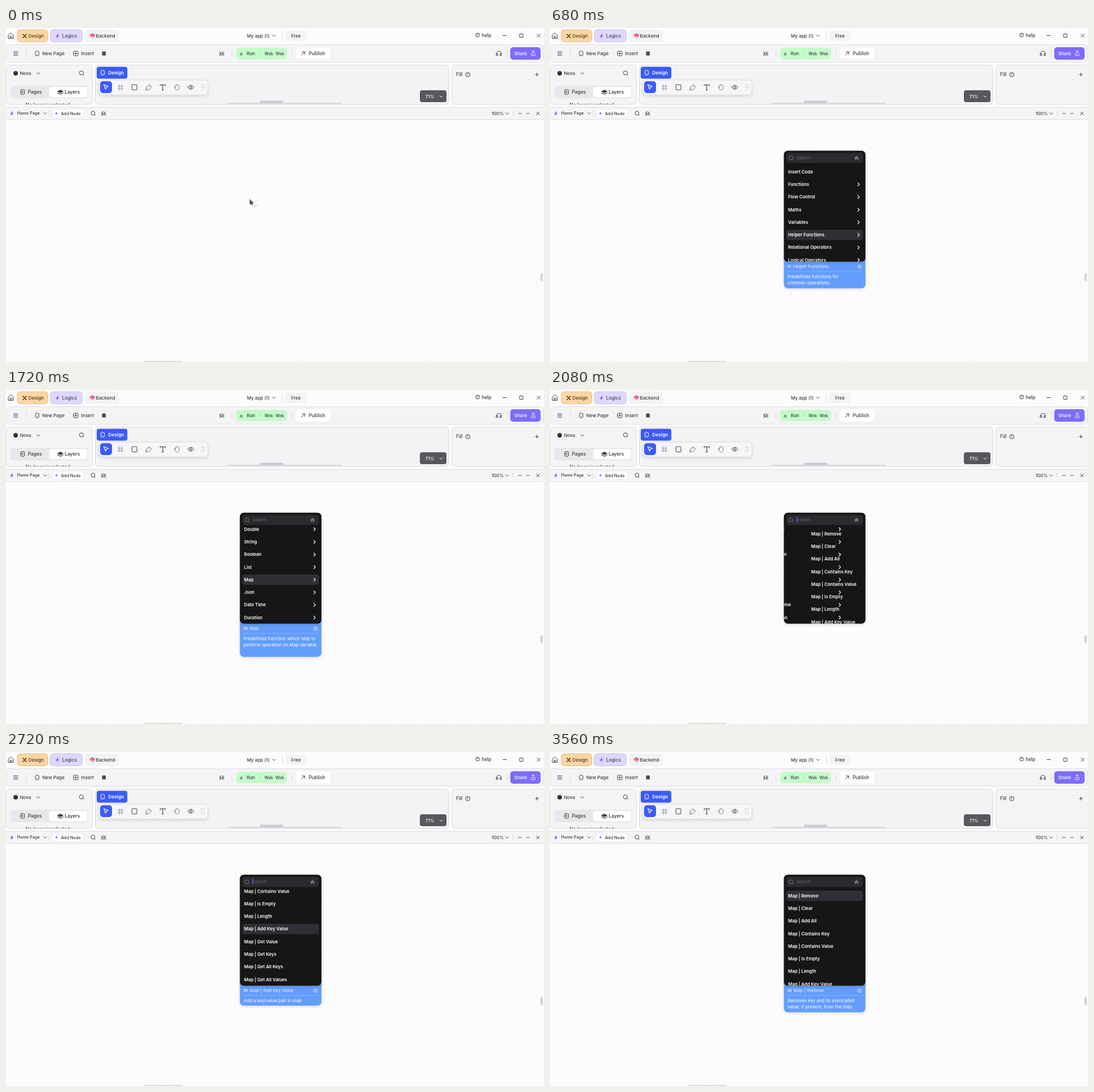
These frames come from a looping animation (949x590 px, 3600 ms). An HTML page:

```html
<!DOCTYPE html>
<html lang="en">
<head>
<meta charset="utf-8">
<title>Node menu</title>
<style>
html, body { margin: 0; width: 100%; height: 100%; overflow: hidden; background: #fdfcfd; }
svg { display: block; font-family: Inter, Roboto, sans-serif; font-weight: 500; }
text { white-space: pre; }
</style>
</head>
<body>
<svg id="stage" width="949" height="590" viewBox="0 0 949 590"></svg>
<script>
const stage = document.getElementById('stage');
const INK = '#3c3c40';

const box = (x, y, w, h, r, fill, line = 'none', more = '') =>
  `<rect x="${x}" y="${y}" width="${w}" height="${h}" rx="${r}" fill="${fill}" stroke="${line}" ${more}/>`;
const label = (x, cy, s, size = 8.2, fill = INK, weight = 500) =>
  `<text x="${x}" y="${cy + size * .36}" font-size="${size}" fill="${fill}" font-weight="${weight}">${s}</text>`;
const line = (d, color = INK, w = 1, fill = 'none') =>
  `<path d="${d}" fill="${fill}" stroke="${color}" stroke-width="${w}" stroke-linecap="round" stroke-linejoin="round"/>`;
const dot = (x, y, r, fill, edge = 'none') =>
  `<circle cx="${x}" cy="${y}" r="${r}" fill="${fill}" stroke="${edge}"/>`;
const down = (x, y, color = INK) => line(`M${x - 2.5} ${y - 1.2}l2.5 2.5 2.5-2.5`, color);
const plus = (x, y, r, color = INK) => line(`M${x - r} ${y}h${2 * r}M${x} ${y - r}v${2 * r}`, color);
const cross = (x, y, r) => line(`M${x - r} ${y - r}l${2 * r} ${2 * r}m0 ${-2 * r}l${-2 * r} ${2 * r}`);
const rule = (x, y, h) => line(`M${x} ${y}v${h}`, '#d8d8dc');
const lens = (x, y, r, color = INK) =>
  dot(x, y, r, 'none', color) + line(`M${x + r * .72} ${y + r * .72}l1.6 1.6`, color);
const bolt = (x, y, color) => line(`M${x + 1} ${y - 3.5}l-3.5 4h2l-1 3.2 3.6-4.3h-2z`, color, .6, color);
const phone = (x, y, color) =>
  box(x - 3, y - 4, 6, 8, 1.4, 'none', color) + line(`M${x - .5} ${y + 2}h1`, color, .8);
const bug = (x, y) =>
  line(`M${x - 2} ${y - 1.5}q2-3.4 4 0v2.6q-2 4-4 0z` +
    [-1.6, .6, 2.6].map(d => `M${x - 2} ${y + d}l-2 ${d * .4}M${x + 2} ${y + d}l2 ${d * .4}`).join('') +
    `M${x - 1} ${y + .6}h2`, INK, .9);
const help = (x, y, r) => dot(x, y, r, 'none', INK) + label(x - 1.9, y, '?', r * 1.65);

function titleBar() {
  return line('M4.3 12.3l4.2-3.8 4.2 3.8v6h-8.4zM7.3 18v-3.5h2.4V18') +
    box(20, 3, 54, 21.5, 5, '#fad6a3', '#e9c084') +
    line('M30 11l6 6M36 11l-6 6', '#4b3616', 1.6) + label(39.5, 14, 'Design', 8.2, '#4b3616') +
    box(78, 3, 56.5, 21.5, 5, '#dfd8fb', '#c9bff0') +
    bolt(91, 14, '#8058f5') + label(99, 14, 'Logics', 8.3, '#4a4160') +
    box(139, 3, 60.5, 21.5, 5, '#f3f2f4') +
    line('M149 14.5q-2-3.5 1.5-3.7 1.5-2.4 3.6 0 3.4.1 2 3.7z', '#f0608c', .8, '#f0608c') +
    line('M150.7 15v2.5M152.7 15v3M154.7 15v2.5', '#f0608c', .8) +
    label(158.5, 14, 'Backend', 8.2) +
    label(425, 14, 'My app (1)', 8) + down(472.5, 13.8) + rule(487.5, 8, 12) +
    box(493, 5, 36.5, 17.5, 4, '#f3f3f4') + label(503, 14, 'Free', 8) +
    help(832, 12.5, 3.4) + label(839, 12.7, 'help', 8.3) +
    line('M876.5 13.5h6.5') + box(906, 10.5, 6, 6, .5, 'none', INK) + cross(939.5, 13.5, 2.8);
}

function toolBar() {
  return box(.5, 29.5, 948, 31, 6, '#f4f3f5', '#dedde1') +
    line('M13.5 42h7.5M13.5 45h7.5M13.5 48h7.5') + rule(36, 39, 12) +
    phone(55, 45, INK) + label(64, 45, 'New Page', 8.1) +
    box(119, 41, 8, 8, 1.5, 'none', INK) + plus(123, 45, 2) + label(132.5, 45, 'Insert', 8.2) +
    box(169.5, 41.5, 6.5, 7, 0, '#4a4a4e') + bug(380.5, 45) + rule(398.5, 39, 12) +
    box(406.5, 35, 89, 20, 5, '#c6fac9') + dot(415, 46, 2.6, '#78a881') +
    label(424.5, 45, 'Run', 8.1) + line('M447.5 40v10', '#b0e6b4') +
    label(456, 45.4, 'Web', 7) + label(475.5, 45.4, 'Web', 7) + rule(504, 39, 12) +
    box(512, 34.5, 60, 20.5, 4, '#fff') + line('M521.5 47.7l5.4-5.4M522.5 42.2h4.5v4.5') +
    label(534, 45, 'Publish', 8.3) +
    line('M865 46.2q0-4.8 4.5-4.8t4.5 4.8M865.2 45.5h2.2v3h-2.2zM871.6 45.5h2.2v3h-2.2z') + rule(884, 39, 12) +
    box(889.5, 34, 53.5, 22, 5, '#7d6df7') + label(896.5, 45, 'Share', 8.1, '#fff') +
    line('M926.8 45v3.8h6.4V45M930 46.5v-6.2M927.8 42.3l2.2-2.2 2.2 2.2', '#fff', .9);
}

function panels() {
  const grips = [344.5, 348.5].map(x => [101, 104.8, 108.6].map(y => dot(x + .5, y, .9, '#bdbdc4')).join('')).join('');
  return box(.5, 65.5, 152, 69.5, 6, '#f4f4f6', '#dcdce0') +
    dot(17, 80, 4, '#333336') + label(24.5, 80, 'Nova', 8, INK) + down(57, 80) + lens(133, 79.3, 3.6) +
    box(8, 102, 136.5, 22.5, 5, '#e8e8eb') + box(76, 104, 67.5, 18.7, 4, '#fff', '#ececef') +
    line('M27 109h4.5q1 0 1 1v6q0 1-1 1H27q-1 0-1-1v-6q0-1 1-1M26 113h4M28.6 111.5l1.5 1.5-1.5 1.5') +
    label(38.5, 113, 'Pages', 8.4) +
    line('M91 112l5-2.6 5 2.6-5 2.6z', INK, .8, INK) + line('M91 114.6l5 2.6 5-2.6', INK, 1.1) +
    label(103.5, 113, 'Layers', 8.4, '#2e2e32') +
    `<g clip-path="url(#tops)">${label(34.5, 136, 'No layer is selected', 8.4)}</g>` +
    box(157.5, 65.5, 623.5, 69.5, 6, '#f3f3f5', '#d9d9de') +
    box(392, 132, 200, 2.6, 1, '#dadade') + box(448, 128.6, 41, 4, 1, '#cacad4') +
    box(160, 68.5, 54, 21, 4, '#3c5bf4') + phone(170.5, 79, '#fff') + label(180.5, 79.2, 'Design', 8.2, '#fff', 600) +
    box(164, 92, 192, 26, 6, '#f6f6f8', '#dfdfe4', 'filter="url(#soft)"') +
    box(166, 94, 21, 21, 5, '#3c5bf4') + line('M172.5 100l8 3.2-3.4 1.3-1.4 3.5z', '#fff', 1.1) +
    line('M199.8 100v10M204 100v10M197 102.9h10M197 107h10', '#8e8e94', .9) +
    box(222, 100.2, 9, 9, 1, 'none', INK) +
    line('M246.5 109.5l1.3-6.2 4.6-2.2 3.5 3.5-2.4 4zM246.5 109.5l4.3-4.4M252.5 100l4 4', '#77777d', .9) +
    line('M272 102v-1.8h9v1.8M276.5 100.2v9.3M275 109.5h3', INK, 1.1) +
    line('M297.5 105.5l-1.2-1.4q1.5-1.4 2.8 1.2v-4.4q1-1 1.6 0v-1q1-1 1.6 0v1q1-1 1.6 0v1.2q1-1 1.6 0v4q-.5 3.8-4 3.8-2.6 0-4-4.4z', '#77777d', .9) +
    line('M320.5 104.7q5.5-7.4 11 0-5.5 7.4-11 0z') + dot(326, 104.7, 1.7, 'none', INK) + grips +
    box(730, 110, 47, 21, 4, '#57585c') + label(739.5, 121, '71%', 8.2, '#fff') + down(767.5, 121, '#fff') +
    box(786.5, 65.5, 166, 69.5, 6, '#f4f4f6', '#dcdce0') + label(794, 82.5, 'Fill', 8.3) +
    help(814.5, 82.3, 3.9) + plus(936.5, 82.3, 2.8);
}

function canvas() {
  return box(-2, 162, 953, 430, 0, '#fdfcfd') + box(0, 162, 949, 428, 0, 'url(#dots)') +
    box(-.5, 140, 950, 21.7, 4, '#f5f4f6', '#dcdce0') +
    bolt(10.5, 151, '#7a55f2') + label(19.5, 150.6, 'Home Page', 7.3) + down(69, 150.8) + rule(76, 146, 10) +
    box(82, 143.5, 55, 14.5, 4, '#fff', '#ececf0') + plus(89, 150.8, 2, '#6a4df0') + label(97, 151, 'Add Node', 7.3) +
    lens(153.3, 150.4, 3.4) + bug(172, 151) +
    label(856.5, 151, '100%', 8) + down(884, 151) + rule(894.5, 147, 8) +
    line('M904.2 152.2l2.5-2.5 2.5 2.5') + [918.5, 920.8, 923.1].map(x => dot(x, 151, .8, INK)).join('') +
    cross(938.3, 151, 2.6) +
    box(942.5, 433, 4.5, 14, 1.5, '#d5d5da') + box(243, 588.6, 67.5, 2, 0, '#d3d0c8');
}

// Menu content
const mapItems = ['Remove', 'Clear', 'Add All', 'Contains Key', 'Contains Value', 'Is Empty', 'Length',
  'Add Key Value', 'Get Value', 'Get Keys', 'Get All Keys', 'Get All Values'].map(s => 'Map | ' + s);
const lists = [
  ['Insert Code', 'Functions', 'Flow Control', 'Maths', 'Variables', 'Helper Functions',
    'Relational Operators', 'Logical Operators'],
  ['Integer', 'Double', 'String', 'Boolean', 'List', 'Map', 'Json', 'Date Time', 'Duration'],
  mapItems
];
const about = name => ['Predefined Function which help to', `perform operation on ${name} variable`, ''];
const notes = {
  'Insert Code': ['Add your own custom Pell', 'language code, with full Tamorin', 'SDK support.'],
  'Variables': ['Get and set the variables', 'of your app.'],
  'Helper Functions': ['Predefined functions for', 'common operations.'],
  'Integer': about('Integer'),
  'Map': about('Map'),
  'Map | Remove': ['Removes key and its associated', 'value, if present, from the map.'],
  'Map | Add Key Value': ['Add a key/value pair in map']
};
const PITCH = 22.28, TOP = 254;

const listMarkup = (items, k) => `<g id="list${k}">` +
  box(417, 244.8, 135, 18.4, 4, '#2f2f35', 'none', `id="lit${k}"`) +
  items.map((s, i) => label(420, TOP + i * PITCH, s, 7.8, '#fff', 600) +
    (k === 2 || s === 'Insert Code' ? '' : line(`M543 ${TOP + i * PITCH - 2.7}l2.7 2.7-2.7 2.7`, '#fff', 1.2))
  ).join('') + '</g>';

const menu = `<g id="menu"><g id="card" filter="url(#soft)">
  ${box(412.5, 400, 144, 71.5, 7, '#639dfb', 'none', 'id="blue"')}<g id="note"></g></g>
  ${box(412.5, 216.7, 144, 196, 7, '#131316', 'none', 'filter="url(#soft)"')}
  <g clip-path="url(#rows)">${lists.map(listMarkup).join('')}</g>
  ${box(417, 220.5, 135, 18, 4, '#2a2a2f')}
  ${lens(425, 229.3, 3.4, '#77777d')}${label(434.5, 229.2, 'Search', 7.8, '#66666c', 400)}
  ${line('M537 229.6l3.7-3.6 3.7 3.6h-1v3.2h-1.8v-2.3h-1.8v2.3H538v-3.2z', '#75757b', .5, '#75757b')}
  ${box(434.8, 224.2, 1.2, 10, 0, '#3f7cf4', 'none', 'id="caret"')}</g>`;

const pointer = `<g id="pointer">${line('M430 303l.3 9 2.2-2 1.5 3 1.2-.6-1.4-2.9 2.9-.3z', '#4a4a4c', .6, '#4a4a4c')}
  ${label(436.5, 313.3, 'cr', 6.5, '#b5b5b9', 400)}</g>`;

stage.innerHTML = `<defs>
  <pattern id="dots" x="2.7" y="164.7" width="19.64" height="19.64" patternUnits="userSpaceOnUse">${dot(9.82, 9.82, 1, '#e3e0e8')}</pattern>
  <clipPath id="rows"><rect x="412.5" y="238" width="144" height="174.7"/></clipPath>
  <clipPath id="tops"><rect x="0" y="130" width="150" height="4.8"/></clipPath>
  <filter id="soft" x="-20%" y="-20%" width="140%" height="150%"><feDropShadow dx="0" dy="2" stdDeviation="2.5" flood-color="#000" flood-opacity=".13"/></filter>
  </defs>${box(0, 0, 949, 590, 0, '#fdfcfd')}` + titleBar() + toolBar() + panels() + canvas() + menu + pointer;

// Timeline: [start, list, row, row is lit]
const steps = [
  [280, 0, 0, 1], [560, 0, 4, 1], [640, 0, 5, 1], [800, -1],
  [1060, 1, 0, 0], [1120, 1, 0, 1], [1420, 1, 5, 1], [2000, -1],
  [2260, 2, 0, 0], [2360, 2, 0, 1], [2600, 2, 7, 1], [3360, 2, 0, 1]
];
const LOOP = 3600, OPEN = 280, SHIFT = 140;
const $ = id => document.getElementById(id);
const show = (id, on) => $(id).style.display = on ? '' : 'none';
const part = (t, a, b) => Math.min(1, Math.max(0, (t - a) / (b - a)));
const ease = u => 1 - (1 - u) ** 3;
let shown = '';

function fillNote(title) {
  if (title === shown) return;
  shown = title;
  const rows = notes[title];
  $('blue').setAttribute('height', 48 + 11.7 * (rows.length - 1));
  $('note').innerHTML =
    `<text x="419" y="424.3" font-size="7.9" fill="#eaf2ff" font-weight="400"><tspan font-weight="500" dy="-.8">${title[0]}</tspan><tspan dx="3.6" dy=".8">${title}</tspan></text>` +
    dot(546, 421.5, 3, 'none', '#eaf2ff') + line('M546 421.3v1.6M546 419.9v.1', '#eaf2ff', .9) +
    `<path d="M419 430h131" stroke="#a5c7fd" stroke-width=".8" stroke-dasharray="2 1"/>` +
    rows.map((s, i) => label(419, 439.4 + i * 11.2, s, 7.85, '#fff', 400)).join('');
}

function draw(t) {
  const open = t >= OPEN;
  show('menu', open);
  show('pointer', !open);
  if (!open) return;
  const slides = [1, ease(part(t, 800, 1040)), ease(part(t, 2000, 2240)), 0];
  const scroll = [0, 30.3 * ease(part(t, 1240, 1420)),
    97.3 * (ease(part(t, 2420, 2600)) - ease(part(t, 3160, 3360)))];
  const [, list, row, lit] = steps.filter(s => s[0] <= t).pop();
  lists.forEach((items, k) => {
    const enter = slides[k], leave = slides[k + 1];
    show('list' + k, enter > 0 && leave < 1);
    $('list' + k).setAttribute('transform',
      `translate(${SHIFT * (1 - enter) - SHIFT / 3 * leave} ${-scroll[k]})`);
    show('lit' + k, k === list && lit);
    if (k === list) $('lit' + k).setAttribute('y', 244.8 + row * PITCH);
  });
  show('card', list >= 0);
  if (list >= 0) fillNote(lists[list][row]);
  show('caret', (t - 300) % 560 < 280);
}

function tick() {
  draw(performance.now() % LOOP);
  requestAnimationFrame(tick);
}
tick();
</script>
</body>
</html>
```
